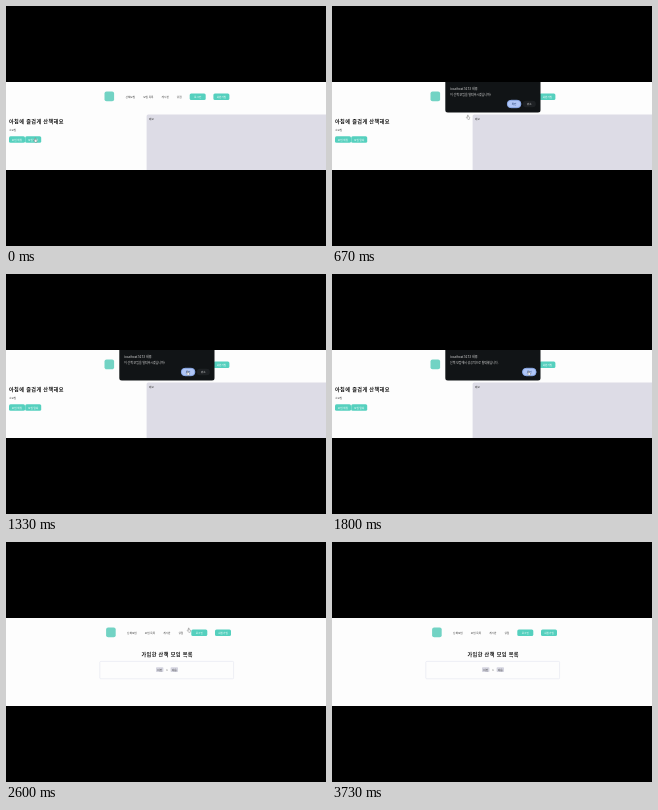
An HTML page that plays this animation: 320x240 px, repeating every 3.79 s.

```html
<!DOCTYPE html>
<html lang="ko">
<head>
<meta charset="utf-8">
<style>
  html, body { margin: 0; width: 100%; height: 100%; overflow: hidden; background: #000; }
  svg { display: block; width: 320px; height: 240px; }
  text { font-family: "Noto Sans CJK KR", "Noto Sans CJK", "Noto Sans", sans-serif; font-size: 2.6px; fill: #333; }
  .title { font-size: 5.1px; letter-spacing: .42px; font-weight: 700; fill: #111; }
  .mid { text-anchor: middle; }
  .teal { fill: #55d0be; }
  .teal + text { fill: #fff; }
  .dialog text { fill: #e6e6e6; }
  .dialog .host { font-size: 3.1px; font-weight: 500; }
  .dialog .message { font-size: 2.9px; }
  .dialog .ok { fill: #b0c6f6; stroke: #8cacee; stroke-width: .9; }
  .dialog .ok + text { fill: #17356b; }
</style>
</head>
<body>
<svg viewBox="0 0 320 240">
  <defs>
    <clipPath id="screen"><rect y="76" width="320" height="88"/></clipPath>
    <g id="dialogBox" class="dialog">
      <rect x="113.3" y="72" width="95.2" height="34.6" rx="2.5" fill="#111416"/>
      <text class="host" x="118" y="83.5">localhost:5173 내용:</text>
    </g>
  </defs>
  <g clip-path="url(#screen)">
    <rect y="76" width="320" height="89" fill="#fdfdfd"/>

    <g id="nav">
      <rect x="98.5" y="85.5" width="9.6" height="9.8" rx="2" fill="#72d3c4"/>
      <g class="mid">
        <text x="124.3" y="92">산책모임</text>
        <text x="142.3" y="92">모임 목록</text>
        <text x="159.2" y="92">게시판</text>
        <text x="173.2" y="92">상점</text>
        <rect class="teal" x="183.7" y="87.5" width="16" height="6.6" rx="1.5"/>
        <text x="191.7" y="91.8">로그인</text>
        <rect class="teal" x="207.4" y="87.5" width="16" height="6.6" rx="1.5"/>
        <text x="215.4" y="91.8">회원가입</text>
      </g>
    </g>

    <g id="detail">
      <text class="title" x="3" y="117">아침에 즐겁게 산책해요</text>
      <text x="3" y="124.7">소모임</text>
      <g class="mid">
        <rect class="teal" x="3" y="130.2" width="16" height="6.6" rx="1.5"/>
        <text x="11" y="134.5">모임 채팅</text>
        <rect class="teal" x="19.2" y="130.2" width="16" height="6.6" rx="1.5"/>
        <text x="27.2" y="134.5">모임 탈퇴</text>
      </g>
      <rect x="140.6" y="108.5" width="182" height="60" rx="1.5" fill="#dddce6"/>
      <text x="143" y="114">메모</text>
    </g>

    <g id="list">
      <text class="title mid" x="161.2" y="114">가입한 산책 모임 목록</text>
      <rect x="93.8" y="119.4" width="133.8" height="17.4" rx="1" fill="none" stroke="#e3e5ee" stroke-width=".6"/>
      <g class="mid">
        <rect x="150" y="125.3" width="7.4" height="4.8" rx=".8" fill="#d4d4df"/>
        <text x="153.7" y="128.7">이전</text>
        <text x="161" y="128.7">1</text>
        <rect x="164.6" y="125.3" width="7.4" height="4.8" rx=".8" fill="#d4d4df"/>
        <text x="168.3" y="128.7">다음</text>
      </g>
    </g>

    <g id="confirm" class="dialog">
      <use href="#dialogBox"/>
      <text class="message" x="118" y="89.7">이 산책 모임을 탈퇴하시겠습니까?</text>
      <g class="mid">
        <rect class="ok" x="175.3" y="94.3" width="13.6" height="7.4" rx="3.7"/>
        <text x="182.1" y="99">확인</text>
        <rect x="190.8" y="94.8" width="13" height="6.4" rx="3.2" fill="#1d2023"/>
        <text x="197.3" y="99">취소</text>
      </g>
    </g>

    <g id="notice" class="dialog">
      <use href="#dialogBox"/>
      <text class="message" x="118" y="89.7">산책 모임에서 성공적으로 탈퇴했습니다.</text>
      <g class="mid">
        <rect class="ok" x="190.5" y="94.3" width="13.6" height="7.4" rx="3.7"/>
        <text x="197.3" y="99">확인</text>
      </g>
    </g>

    <path id="pointer" d="M-.6 -2V.5L-1.5 -.1L-1.7 .5L-.3 2.3H1.2L1.6 .2L.1 -.4V-2Z" fill="#fff" stroke="#555" stroke-width=".35"/>
  </g>
</svg>
<script>
const LOOP = 3790, CONFIRM = 200, NOTICE = 1600, LIST = 2270;
const el = id => document.getElementById(id);
const show = (id, on) => el(id).style.display = on ? '' : 'none';

// Pointer stops: time, x, y
const stops = [
  [0, 29.5, 134], [220, 29.5, 134], [400, 50.5, 133.5], [850, 182, 99],
  [1600, 182, 99], [1780, 197, 99], [2270, 197, 99],
  [2600, 183, 88], [2800, 183, 88], [3150, 178, 70], [LOOP, 178, 70]
];

function pointerAt(t) {
  const i = stops.findIndex(s => s[0] > t);
  const [a, b] = [stops[i - 1], stops[i]];
  const u = (t - a[0]) / (b[0] - a[0]);
  const k = u * u * (3 - 2 * u);
  return [1, 2].map(n => a[n] + (b[n] - a[n]) * k);
}

function draw(now) {
  const t = now % LOOP;
  const listed = t >= LIST;
  show('detail', !listed);
  show('list', listed);
  show('confirm', t >= CONFIRM && t < NOTICE);
  show('notice', t >= NOTICE && !listed);
  el('nav').setAttribute('transform', `translate(${listed ? 1.6 : 0})`);
  el('pointer').setAttribute('transform', `translate(${pointerAt(t)})`);
}

const start = performance.now();
function tick() {
  draw(performance.now() - start);
  requestAnimationFrame(tick);
}
tick();
</script>
</body>
</html>
```
